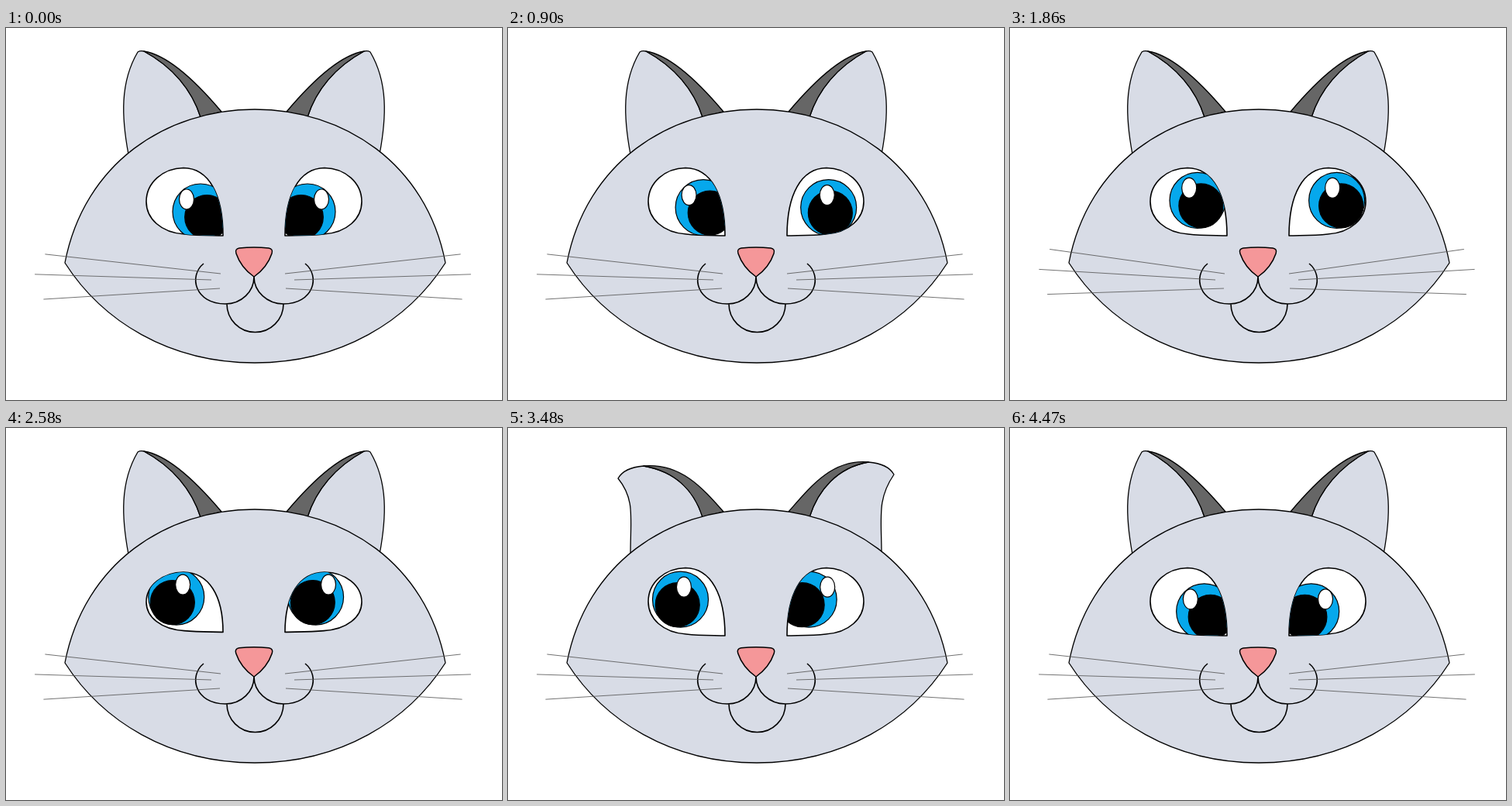
Recreate the animation shown at these times as an HTML page with a canvas. Size 640 by 480 pixels, loop 4500 ms.

```html
<!DOCTYPE html>
<html>
<head>
<meta charset="utf-8">
<style>
html, body { margin: 0; width: 100%; height: 100%; overflow: hidden; background: #fff; }
canvas { display: block; }
</style>
</head>
<body>
<canvas id="stage" width="640" height="480"></canvas>
<script>
const ctx = document.getElementById('stage').getContext('2d');
const LOOP = 4500, BEAT = 900, FUR = '#d8dce6';
const { sin, cos, PI } = Math;

const head = new Path2D('M76 303C101 174 207 105 321 105S542 174 567 303C519 378 432 432 321 432S124 378 76 303Z');
const eyeShape = new Path2D('M280 268C280 215 262 181 229 180.5C202 181 181 200 181 224C181 246 200 264 230 266C248 268 265 267.5 280 268Z');
const noseShape = new Path2D('M301 284Q320 282 339 284Q345 285 343 291Q337 309 320 321Q303 309 297 291Q295 285 301 284Z');
const mouth = new Path2D('M255 304C235 320 244 356 283 356C304 356 320 340 320 321C320 340 337 356 358 356C397 356 406 320 386 304M285 356A36.5 36.5 0 0 0 358 356');

// Half a sine wave from 0 up to 1 and back
const pulse = (t, start, length) =>
  t > start && t < start + length ? sin(PI * (t - start) / length) : 0;

function paint(path, fill, width = 1.3) {
  ctx.fillStyle = fill;
  ctx.fill(path);
  ctx.lineWidth = width;
  ctx.stroke(path);
}

function oval(x, y, rx, ry, fill) {
  const path = new Path2D();
  path.ellipse(x, y, rx, ry, 0, 0, 2 * PI);
  paint(path, fill, 1.2);
}

function mirrored(draw) {
  ctx.save();
  ctx.translate(640, 0);
  ctx.scale(-1, 1);
  draw();
  ctx.restore();
}

// The tip folds outwards and down as bend goes from 0 to 1
function ear(bend, lift) {
  const mix = (a, b) => a + (b - a) * bend;
  const tip = `${mix(170, 142)} ${mix(31, 65 - lift)}`;
  const top = `${mix(178, 175)} ${mix(30, 49 - lift)}`;
  const outer = `${mix(149, 158)} 115 ${mix(147, 164)} ${mix(70, 92)} ${tip}`;
  const crest = `${mix(173, 150)} ${mix(29, 51 - lift)} ${top}`;
  const back = `${mix(210, 222)} ${mix(35, 45 - lift)} ${mix(246, 250)} ${mix(70, 76)} 278 108`;
  const fold = mix(50, 56 - lift);
  paint(new Path2D(`M158 163C${outer}Q${crest}C215 ${fold} 240 80 251 115`), FUR);
  paint(new Path2D(`M251 115C240 80 215 ${fold} ${top}C${back}Z`), '#666');
}

// Both eyes follow a point on a closed orbit: they drift together and also converge
function gaze(t, side) {
  const a = 2 * PI * t / LOOP, s = sin(a), c = cos(a);
  const drift = 16 * s * (1 - 0.5 * c);
  const cross = -0.5 + 10.5 * c + 5 * c * c;
  return {
    x: 236 + cross + side * drift,
    y: 224.3 + 8.5 * c + 4.2 * c * c + 4.5 * s,
    shine: 228.5 + 0.3 * cross + 1.5 * s + side * (1.5 + 1.7 * s - 1.5 * c)
  };
}

function eye({ x, y, shine }, open) {
  const shape = new Path2D();
  shape.addPath(eyeShape, new DOMMatrix([1, 0, 0, open, 0, 228 * (1 - open)]));
  paint(shape, '#fff', 1.6);
  ctx.save();
  ctx.clip(shape);
  oval(x, y, 36, 36, '#06a8ec');
  oval(x + 0.42 * (x - 231.5), y + 7, 28.5, 28.5, '#000');
  oval(shine, y - 16, 9.5, 13, '#fff');
  ctx.restore();
}

function whisker(x, y, angle) {
  ctx.save();
  ctx.translate(x, y);
  ctx.rotate(angle);
  ctx.beginPath();
  ctx.moveTo(0, 0);
  ctx.lineTo(-228, 0);
  ctx.stroke();
  ctx.restore();
}

function whiskers(lift) {
  ctx.save();
  ctx.strokeStyle = '#555';
  ctx.lineWidth = 0.8;
  whisker(277, 317, 0.11 + lift);
  whisker(265, 325, 0.031 + lift);
  whisker(276, 336, -0.062 + lift);
  ctx.restore();
}

function nose(flare) {
  ctx.save();
  ctx.translate(320, 321);
  ctx.scale(1 + 0.07 * flare, 1 + 0.03 * flare);
  ctx.translate(-320, -321);
  paint(noseShape, '#f59799', 1.5);
  ctx.restore();
}

function frame(now) {
  const t = now % LOOP, beat = t % BEAT;
  const bend = Math.min(1, 1.15 * (pulse(t, 930, 240) + pulse(t, 3180, 540)));
  const open = 1 - 0.92 * pulse(t, 2558, 200) ** 2;
  const lift = 0.044 * pulse(beat, 0, 270);
  ctx.fillStyle = '#fff';
  ctx.fillRect(0, 0, 640, 480);
  ctx.lineJoin = 'round';
  ear(bend, 0);
  mirrored(() => ear(bend, 5));
  paint(head, FUR);
  eye(gaze(t, 1), open);
  mirrored(() => eye(gaze(t, -1), open));
  ctx.lineWidth = 1.6;
  ctx.stroke(mouth);
  nose((1 - cos(2 * PI * beat / BEAT)) / 2);
  whiskers(lift);
  ctx.save();
  ctx.translate(-3, 0);
  mirrored(() => whiskers(lift));
  ctx.restore();
}

const start = performance.now();
function tick() {
  frame(performance.now() - start);
  requestAnimationFrame(tick);
}
tick();
</script>
</body>
</html>
```
